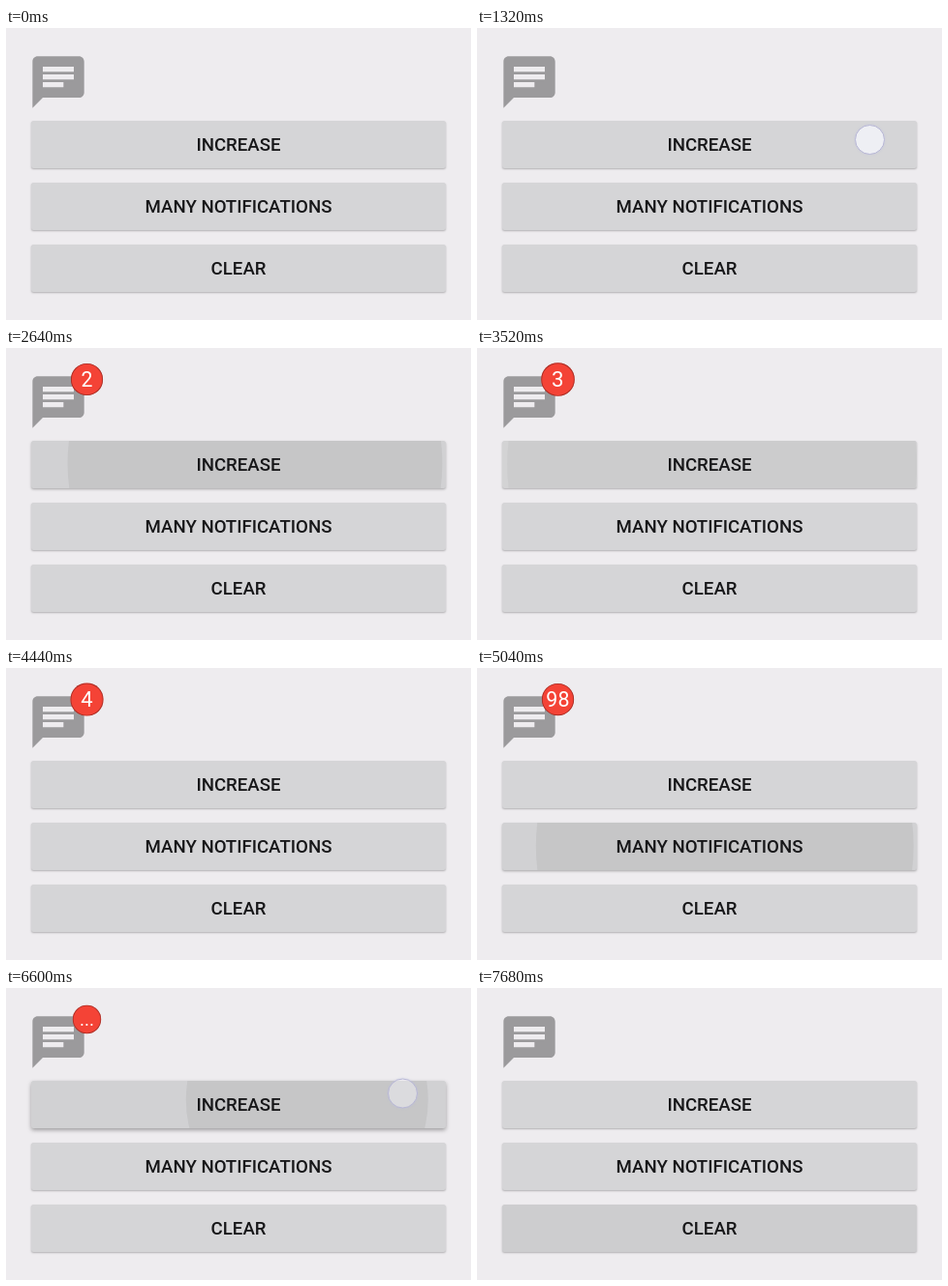
These frames come from a looping animation (480x302 px, 8.32 s). An HTML page:

```html
<!DOCTYPE html>
<html lang="en">
<head>
<meta charset="utf-8">
<title>Notification badge</title>
<style>
html, body { margin: 0; width: 100%; height: 100%; overflow: hidden; background: #eeecef; }
#stage { position: relative; width: 480px; height: 302px; overflow: hidden; font-family: Roboto, Arial, sans-serif; }
#icon { position: absolute; left: 21.6px; top: 24.2px; width: 64px; height: 64px; fill: #9b9a9c; }
.button {
  position: absolute; left: 26px; width: 428px; height: 48.6px; border-radius: 2.5px;
  background: #d5d5d7; overflow: hidden;
}
.button span {
  position: absolute; inset: 0; text-align: center; font-weight: 500;
  font-size: 18.67px; line-height: 50px; color: #171719; white-space: nowrap;
}
.shade { position: absolute; inset: 0; background: #000; opacity: 0; }
.ripple {
  position: absolute; left: -215px; top: -215px; width: 430px; height: 430px;
  border-radius: 50%; background: #000; opacity: 0;
}
#badge {
  position: absolute; left: 68.6px; top: 17.9px; width: 28.8px; height: 28.8px; border-radius: 50%;
  background: #f44336; box-shadow: inset 0 0 0 .8px rgba(90, 25, 20, .5);
  color: #fff; font-size: 18.67px; line-height: 30px; text-align: center;
}
#touch {
  position: absolute; left: -15.5px; top: -15.5px; width: 31px; height: 31px; box-sizing: border-box;
  border: 1.5px solid #b7b6d6; border-radius: 50%; box-shadow: 0 0 2px rgba(185, 190, 225, .6);
}
</style>
</head>
<body>
<div id="stage">
  <svg id="icon" viewBox="0 0 24 24"><path d="M20 2H4c-1.1 0-1.99.9-1.99 2L2 22l4-4h14c1.1 0 2-.9 2-2V4c0-1.1-.9-2-2-2zM6 9h12v2H6V9zm8 5H6v-2h8v2zm4-6H6V6h12v2z"/></svg>
  <div class="button" style="top:96px"><div class="shade"></div><div class="ripple"></div><span>INCREASE</span></div>
  <div class="button" style="top:160px"><div class="shade"></div><div class="ripple"></div><span>MANY NOTIFICATIONS</span></div>
  <div class="button" style="top:224px"><div class="shade"></div><div class="ripple"></div><span>CLEAR</span></div>
  <div id="badge"></div>
  <div id="touch"></div>
</div>
<script>
const LOOP = 8320;
const taps = [
  { down: 1320, click: 1400, button: 0, x: 405, y: 115, text: "1" },
  { down: 2320, click: 2515, button: 0, x: 409, y: 109, text: "2" },
  { down: 3160, click: 3310, button: 0, x: 409, y: 109, text: "3" },
  { down: 4000, click: 4115, button: 0, x: 409, y: 109, text: "4" },
  { down: 4760, click: 4910, button: 1, x: 409, y: 180, text: "98" },
  { down: 5600, click: 5790, button: 0, x: 409, y: 107.5, text: "99" },
  { down: 6440, click: 6590, button: 0, x: 409, y: 108.5, text: "..." },
  { down: 7320, click: 7430, button: 2, x: 409, y: 245, text: "" }
];
const badge = document.getElementById("badge");
const touch = document.getElementById("touch");
const buttons = [...document.querySelectorAll(".button")].map(el => ({
  el, shade: el.querySelector(".shade"), ripple: el.querySelector(".ripple")
}));

const ramp = (t, from, to) => Math.min(1, Math.max(0, (t - from) / (to - from)));
const mix = (a, b, p) => a + (b - a) * p;
const smooth = p => (1 - Math.cos(Math.PI * p)) / 2;

function drawButton(b, index, tap, t) {
  const on = tap && tap.button === index;
  const start = on ? tap.click - 70 : 0;
  const fade = on ? 1 - ramp(t, tap.click + 135, tap.click + 320) : 0;
  const lift = on ? ramp(t, tap.down + 20, tap.down + 110) * (1 - ramp(t, tap.click + 20, tap.click + 160)) : 0;
  b.el.style.boxShadow =
    `0 ${mix(1, 2, lift)}px ${mix(2, 4, lift)}px rgba(0,0,0,${mix(.26, .34, lift)})`;

  const rest = on && index === 2 && t > tap.click ? .02 : 0;
  b.shade.style.opacity = on ? Math.max(rest, .018 * ramp(t, start, start + 80) * fade) : 0;

  const visible = on && t > start && fade > 0;
  b.ripple.style.opacity = visible ? .055 * fade : 0;
  if (!visible) return;
  // The ripple grows while its centre drifts to the middle of the button.
  const p = Math.min(1, (1 - Math.exp(-(t - start) / 100)) / .955);
  const x = mix(tap.x - 26, 214, p);
  const y = mix(tap.y - 96 - 64 * index, 24.5, p);
  b.ripple.style.transform = `translate(${x}px, ${y}px) scale(${p})`;
}

function badgeScale(tap, t) {
  if (!tap) return 0;
  const age = t - tap.click;
  if (tap.text === "1") return smooth(ramp(age, 0, 480));
  if (tap.text === "") return 1 - smooth(ramp(age, 0, 245));
  return 1 + .2 * Math.sin(Math.PI * ramp(age, 0, 500));
}

function draw() {
  const t = performance.now() % LOOP;
  const tap = taps.filter(a => a.down <= t).pop();
  const clicked = taps.filter(a => a.click <= t).pop();

  buttons.forEach((b, i) => drawButton(b, i, tap, t));

  const scale = badgeScale(clicked, t);
  badge.textContent = clicked ? clicked.text || "..." : "";
  badge.style.visibility = scale > .01 ? "visible" : "hidden";
  badge.style.transform = `scale(${scale})`;

  const held = tap && t < tap.click + 30;
  touch.style.visibility = held ? "visible" : "hidden";
  if (held) {
    touch.style.transform = `translate(${tap.x}px, ${tap.y}px)`;
    touch.style.backgroundColor = `rgba(248,249,255,${mix(.72, .42, ramp(t, tap.down, tap.down + 100))})`;
  }
  requestAnimationFrame(draw);
}
draw();
</script>
</body>
</html>
```
